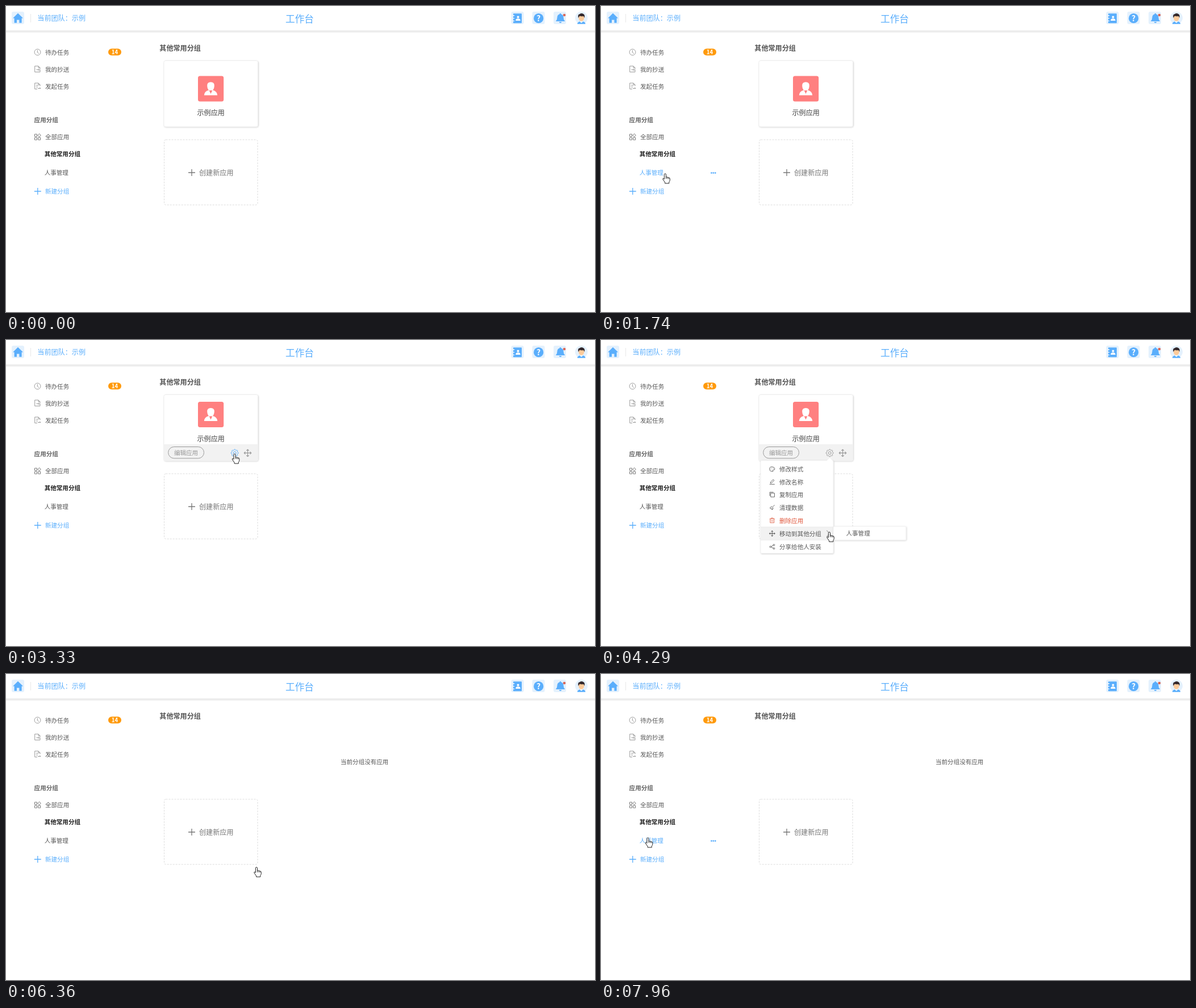
Animation of 1037x540 px, one loop 8000 ms. Source, as an HTML page:

```html
<!DOCTYPE html>
<html lang="zh-CN">
<head>
<meta charset="utf-8">
<style>
html, body { margin: 0; width: 100%; height: 100%; overflow: hidden; background: #fff; }
svg { display: block; width: 100%; height: 100%; }
text { font-family: "Noto Sans CJK SC", "Noto Sans CJK", sans-serif; }
.centred { font-family: "Noto Sans CJK TC", sans-serif; }
</style>
</head>
<body>
<svg id="stage" viewBox="0 0 1037 540">
  <defs>
    <linearGradient id="fade" x2="0" y2="1">
      <stop offset="0" stop-color="#e2e2e2"/><stop offset="1" stop-color="#fff"/>
    </linearGradient>
    <filter id="shadow" x="-10%" y="-20%" width="120%" height="140%">
      <feDropShadow dx=".7" dy=".8" stdDeviation="1.1" flood-opacity=".2"/>
    </filter>
  </defs>
  <g id="fixed"></g>
  <g id="live"></g>
</svg>
<script>
const LOOP = 8000, STEP = 79.7, FIRST = 220;
const BLUE = '#5aaefc', GREY = '#595959', PALE = '#e4f1fd', HOVER = '#f2f2f2';
const RAISED = 'stroke="#ebebeb" stroke-width=".8" filter="url(#shadow)"';
const EVENTS = { show: 225, openMenu: 3400, closeMenu: 5480, removeCard: 6350 };

// Pointer hot spot: time, x, y
const PATH = [
  [230, 210, 492], [1020, 122, 334], [1500, 115, 309], [1580, 115, 309],
  [1740, 113, 296], [1980, 113, 296], [2860, 385, 208], [3330, 402.5, 201],
  [3490, 402.5, 201], [4210, 402, 339], [4770, 402, 339], [5010, 425, 340],
  [5170, 425, 340], [5410, 441, 341], [6600, 441, 341], [6840, 395, 353],
  [7240, 273, 329], [7480, 190, 314], [7960, 82.5, 289], [8000, 82.5, 289]
];

const rect = (x, y, w, h, fill, r = 0, extra = '') =>
  `<rect x="${x}" y="${y}" width="${w}" height="${h}" rx="${r}" fill="${fill}" ${extra}/>`;
const circle = (x, y, r, fill, extra = '') =>
  `<circle cx="${x}" cy="${y}" r="${r}" fill="${fill}" ${extra}/>`;
const line = (d, color, width = 1) =>
  `<path d="${d}" fill="none" stroke="${color}" stroke-width="${width}" stroke-linejoin="round"/>`;
const shape = (d, fill) => `<path d="${d}" fill="${fill}"/>`;
const at = (x, y, content, scale = 1) => `<g transform="translate(${x} ${y}) scale(${scale})">${content}</g>`;
// y is the middle of the line of text
const text = (x, y, str, color = GREY, size = 10.55, weight = 400, anchor = 'start') =>
  `<text x="${x}" y="${y + size * .375}" fill="${color}" font-size="${size}" font-weight="${weight}" text-anchor="${anchor}">${str}</text>`;
const plus = (x, y, color) => line(`M${x - 6} ${y}h12M${x} ${y - 6}v12`, color, 1.3);

const moveIcon = (r, color) => {
  const a = r * .35;
  return line(`M${-r} 0H${r}M0 ${-r}V${r}M${-a} ${a - r}L0 ${-r} ${a} ${a - r}M${-a} ${r - a}L0 ${r} ${a} ${r - a}` +
    `M${a - r} ${-a}L${-r} 0 ${a - r} ${a}M${r - a} ${-a}L${r} 0 ${r - a} ${a}`, color, 1.1);
};

function gearIcon(color) {
  let d = '';
  for (let i = 0; i < 64; i++) {
    const a = i / 64 * 2 * Math.PI, r = 5.8 + .7 * Math.tanh(3 * Math.cos(8 * a));
    d += (i ? 'L' : 'M') + (r * Math.sin(a)).toFixed(2) + ' ' + (r * Math.cos(a)).toFixed(2);
  }
  return line(d + 'Z', color) + circle(0, 0, 2.4, 'none', `stroke="${color}"`);
}

function header() {
  const tiles = [10, 889.5, 926.5, 964].map(x => rect(x, 10, 22, 22, PALE, 3)).join('');
  const home = shape('M21 12.8L30 21.6H27.6V29.7H23.4V24.5H19V29.7H14.6V21.6H12.2Z', BLUE);
  const book = rect(893, 13.2, 15, 17, BLUE, 1) +
    line('M892 17h3.2M892 21.7h3.2M892 26.4h3.2', '#fff', 1.3) +
    circle(901.5, 19.5, 2, '#fff') + shape('M897.3 26q0-4 4.2-4t4.2 4z', '#fff');
  const help = circle(937.7, 21.7, 8.6, BLUE) + text(937.7, 21.9, '?', '#fff', 14, 700, 'middle');
  const bell = shape('M976 13Q977.4 13 977.5 14.4Q981.5 15.7 981.5 20Q981.5 24 983.8 26.3V27H968.2V26.3Q970.5 24 970.5 20Q970.5 15.7 974.5 14.4Q974.6 13 976 13ZM973.7 28H978.3Q977.8 30 976 30T973.7 28Z', BLUE) +
    circle(983, 16, 2.3, '#db6858');
  const avatar = circle(1013, 21, 11, PALE) +
    shape('M1005.8 31.8Q1006 27.5 1013 27.3T1020.2 31.8Z', BLUE) +
    shape('M1010.8 24h4.4v4l-2.2 2-2.2-2z', '#fff') +
    `<ellipse cx="1013" cy="21.2" rx="4.9" ry="5.8" fill="#fccb9b"/>` +
    shape('M1007.8 21Q1006 15 1010 14.3Q1013 12 1016.5 14Q1020 15.5 1018.2 21L1017 18Q1012 18.5 1010 17.5Z', '#33282b');
  return rect(0, 43.4, 1037, 5, 'url(#fade)') + tiles + home + line('M43.5 14v15', '#e8e8e8') +
    text(55.3, 21.6, '当前团队<tspan class="centred">：</tspan>示例', BLUE, 12.1) +
    text(517, 22.6, '工作台', BLUE, 16.7, 400, 'middle') + book + help + bell + avatar;
}

function sidebar() {
  const faint = '#9a9a9a';
  const page = y => line(`M55 ${y + 5}H50.7V${y - 5.5}H57L60 ${y - 2.5}V${y - .5}M57 ${y - 5.5}v3h3`, faint);
  const clock = circle(55.5, 81.5, 5.4, 'none', `stroke="${faint}"`) + line('M55.3 78v4l2.6 1.8', faint);
  const copied = page(111.5) + line('M53.5 112.5h5M57 110.5l2 2-2 2M60 112v4.5h-6', faint);
  const started = page(141.5) + line('M53 140h4M53 143h3M56 145.5h5l-2-2', faint);
  const grid = line('M50.5 226.2h4v4h-4zM50.5 232.2h4v4h-4zM56.7 232.2h4v4h-4zM58.6 225.3l2.6 2.9-2.6 2.9-2.6-2.9z', '#777');
  return clock + copied + started + grid +
    text(69, 82, '待办任务') + text(69, 112, '我的抄送') + text(69, 142, '发起任务') +
    rect(180, 75.3, 23, 12, '#ff9a0c', 6) + text(191.5, 81.6, '14', '#fff', 9.6, 700, 'middle') +
    text(49.6, 201, '应用分组', '#666', 10.55, 700) + text(69, 231.5, '全部应用') +
    text(67.7, 261, '其他常用分组', '#222', 10.55, 700) +
    plus(55.8, 327, BLUE) + text(69, 327.5, '新建分组', BLUE) +
    text(270.3, 74.5, '其他常用分组', '#555', 12.1, 700);
}

function card(active, gearHot) {
  const lift = active ? -14.4 : 0;
  const tile = rect(338, 123.4, 45.2, 45, '#ff8080', 3.5) +
    shape('M360.5 134.3Q367.2 134.3 366.8 141Q366.3 146.5 364 148.5Q371.8 150.5 372.2 157.5H348.8Q349.2 150.5 357 148.5Q354.7 146.5 354.2 141Q353.8 134.3 360.5 134.3Z', '#fff') +
    shape('M357.7 149h5.6l-2.8 6z', '#ff8080');
  const footer = rect(278, 184, 165.5, 29, HOVER) +
    rect(285.7, 188.5, 62.8, 20.3, 'none', 10.1, 'stroke="#999"') +
    text(317, 198.7, '编辑应用', '#999', 10.55, 400, 'middle') +
    at(402.7, 199.4, gearIcon(gearHot ? BLUE : '#999')) + at(425.5, 199.4, moveIcon(6.3, '#999'));
  return rect(278, 96.5, 165.5, 116.5, '#fff', 3, RAISED) +
    at(0, lift, tile + text(360.7, 188.5, '示例应用', '#444', 12.1, 400, 'middle')) + (active ? footer : '');
}

function createBox(top, hot) {
  const color = hot ? BLUE : '#777';
  return rect(278.5, top + .5, 164.5, 115, 'none', 3, `stroke="${hot ? BLUE : '#dcdcdc'}" stroke-dasharray="3 2"`) +
    plus(327, top + 58.5, color) + text(340, top + 58.9, '创建新应用', color, 12.1);
}

const MENU = [
  ['修改样式', line('M2 4.5Q-5 5-5 0T0-4.5T5 0Q5 2 2.5 1.5T2 4.5M-2.8 0h1M-1-2.3h1M2-1.7h1', GREY)],
  ['修改名称', line('M-5 4.7H5M-3.5 2.5L-3 .2 2.2-4.8 4-3-1 1.9Z', GREY)],
  ['复制应用', line('M-2.8-3H4.6V4.5H-2.8ZM-4.6 2.5V-4.8H2.6', GREY)],
  ['清理数据', line('M4.8-4.8L1.2-1.2M-1-2L2 1 .5 4.5-4.5 1ZM-2 2.3l1-1.5M0 3.5l.8-1.5', GREY)],
  ['删除应用', line('M-5-3H5M-2-3V-4.8H2V-3M-3.8-3V4.6H3.8V-3M-1.3-.8v3.4M1.3-.8v3.4', '#e0674f')],
  ['移动到其他分组', moveIcon(5.5, GREY)],
  ['分享给他人安装', line('M-2 0L2.5-3M-2 .6L2.5 3', GREY) +
    [[-3.3, .2], [3.5, -3.3], [3.5, 3.5]].map(([x, y]) => circle(x, y, 1.5, 'none', `stroke="${GREY}"`)).join('')]
];
const MENU_EDGES = [216.5, 239.2, 261.7, 284.2, 306.8, 330, 353, 376.5];

function menu(inside) {
  const onSub = inside(409, 329, 128, 24);
  const rowAt = MENU.findIndex((_, i) => inside(281, MENU_EDGES[i], 128, MENU_EDGES[i + 1] - MENU_EDGES[i]));
  let out = rect(281, 212.5, 128, 164, '#fff', 2, RAISED) + shape('M397.5 213l5.2-5 5.2 5z', '#fff');
  if (rowAt >= 0) out += rect(281, MENU_EDGES[rowAt], 128, MENU_EDGES[rowAt + 1] - MENU_EDGES[rowAt], HOVER);
  out += line('M281 330h128M281 353h128', '#ececec');
  MENU.forEach(([label, icon], i) => {
    const y = (MENU_EDGES[i] + MENU_EDGES[i + 1]) / 2;
    out += at(301.3, y, icon, .9) + text(314, y + .2, label, i === 4 ? '#e0573c' : GREY);
  });
  out += line('M397.3 336l5 5.5-5 5.5', '#999', 1.1);
  if (onSub || rowAt === 5) {
    out += rect(409, 329, 128, 24, onSub ? HOVER : '#fff', 1.5, RAISED) + text(431.5, 341, '人事管理');
  }
  return out;
}

function pointer(p, hand) {
  const d = hand
    ? 'M-1.6 1.3Q-1.5 0 0 0T1.5 1.3V6Q2.6 5.4 4 6.3Q5.2 5.9 6.3 7Q8.2 6.7 8.3 8.6V11.5Q8 13.5 6.8 14.5V17H-.4V15.2L-4 10Q-4.6 8.2-3.2 8.2Q-2.4 8.3-1.6 9.6Z'
    : 'M0 0V14L3.2 11 5.5 16.2 7.6 15.3 5.3 10.2H9.6Z';
  return at(p.x.toFixed(1), p.y.toFixed(1), shape(d, '#fff') + line(d, '#222') +
    (hand ? line('M1.5 6v3M4 6.5v2.7M6.3 7v2.4', '#222', .9) : ''));
}

function pathAt(t) {
  const i = Math.max(1, PATH.findIndex(k => k[0] >= t));
  const [t0, x0, y0] = PATH[i - 1], [t1, x1, y1] = PATH[i];
  const k = Math.max(0, (t - t0) / (t1 - t0));
  return { x: x0 + (x1 - x0) * k, y: y0 + (y1 - y0) * k };
}

function scene(t) {
  const visible = t > EVENTS.show;
  const p = visible ? pathAt(t) : { x: -99, y: -99 };
  const inside = (x, y, w, h) => p.x >= x && p.x < x + w && p.y >= y && p.y < y + h;
  const menuOpen = t >= EVENTS.openMenu && t < EVENTS.closeMenu;
  const hasCard = t < EVENTS.removeCard;
  const groupHot = inside(50, 278, 153, 31);
  const createTop = hasCard ? 235.5 : 220.5;

  let out = text(67.7, 294.5, '人事管理', groupHot ? BLUE : GREY);
  if (groupHot) out += [194.4, 197.8, 201.2].map(x => circle(x, 294.6, 1.4, BLUE)).join('');
  out += hasCard
    ? card(menuOpen || inside(278, 96, 166, 117), !menuOpen && inside(395, 192, 15, 15))
    : text(631.2, 155, '当前分组没有应用', GREY, 10.55, 400, 'middle');
  out += createBox(createTop, !menuOpen && inside(278, createTop, 165, 116));
  if (menuOpen) out += menu(inside);
  const hand = menuOpen || inside(50, 215, 153, 125) || inside(265, 88, 186, 272);
  return out + (visible ? pointer(p, hand) : '');
}

document.getElementById('fixed').innerHTML = header() + sidebar();
const live = document.getElementById('live');
let shown = null;

// The screen advances in coarse steps
function frame(now) {
  const step = Math.floor((now % LOOP - FIRST) / STEP);
  if (step !== shown) {
    live.innerHTML = scene(step < 0 ? 0 : FIRST + step * STEP + 10);
    shown = step;
  }
  requestAnimationFrame(frame);
}
frame(performance.now());
</script>
</body>
</html>
```
